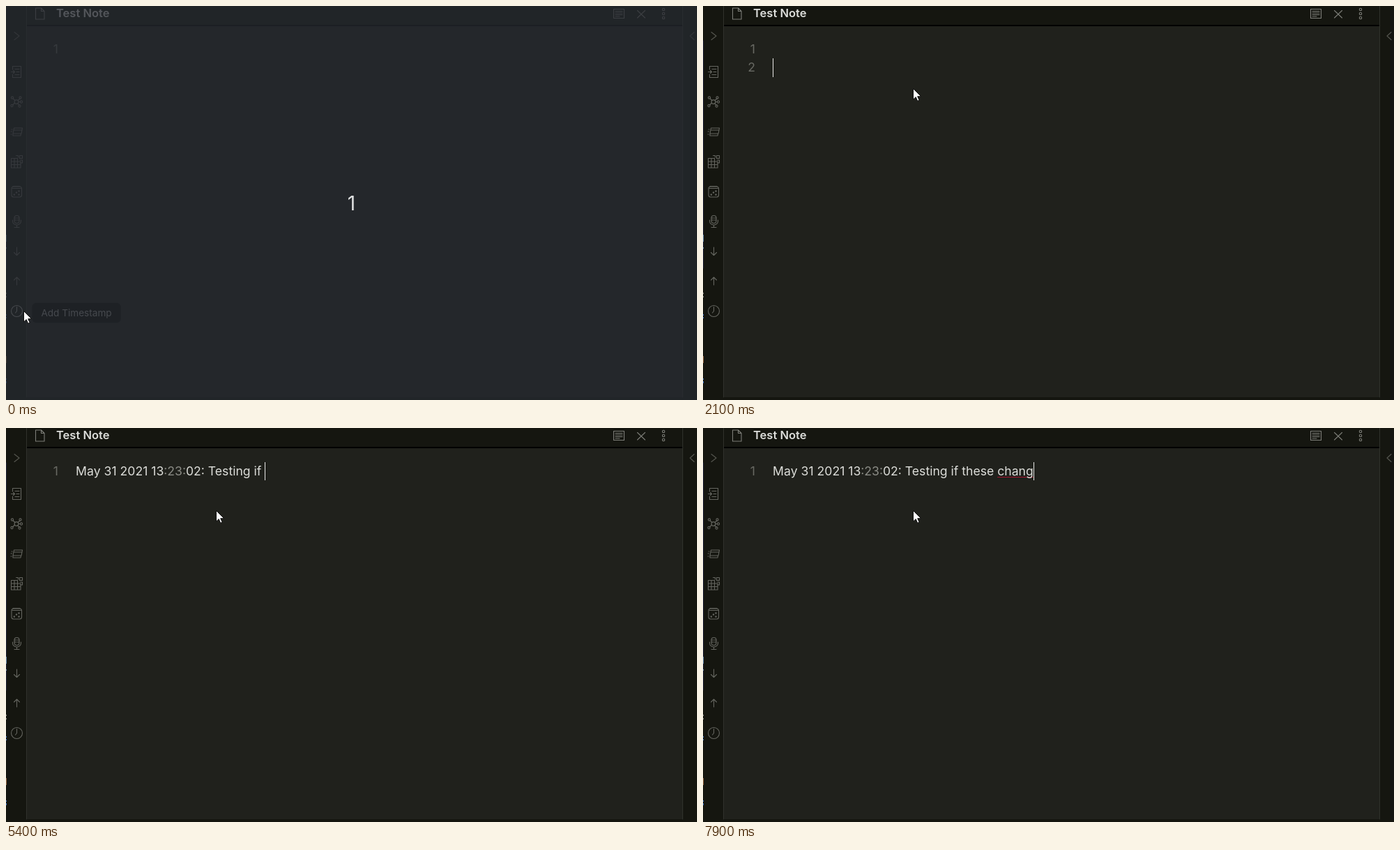
An HTML page that plays this animation: 991x565 px, repeating every 8000 ms.

```html
<!DOCTYPE html>
<html lang="en">
<head>
<meta charset="utf-8">
<title>Timestamp note</title>
<style>
  html, body { margin: 0; width: 100%; height: 100%; overflow: hidden; background: #20211c; }
  body { font-family: Inter, sans-serif; }
  #stage { position: relative; width: 991px; height: 565px; overflow: hidden; }
  #stage > * { position: absolute; }
  svg { left: 0; top: 0; overflow: visible; }
  #title { left: 72px; top: 0; font-size: 16.5px; font-weight: 600; line-height: 21px; color: #dcddda; }
  #gutter, #note { top: 49px; font-size: 17.6px; line-height: 26.4px; white-space: pre; }
  #gutter { left: 40px; width: 35px; text-align: right; color: #686963; }
  #note { left: 100px; color: #dcddd9; }
  #note span { font-kerning: none; }
  #note i { font-style: normal; color: #8b8c86; }
  #note u { text-decoration: underline 1.4px #a5142f; text-underline-offset: 2px; text-decoration-skip-ink: none; }
  #note b { display: inline-block; width: 1px; height: 26.4px; margin-right: -1px; vertical-align: top; background: #e8e8e6; }
  #tip { left: 34px; top: 425px; width: 134px; height: 30px; border-radius: 6px; background: #000;
         color: #c6c7c4; font-size: 14.3px; line-height: 30px; text-align: center; white-space: nowrap; }
  #veil { inset: 0; background: rgba(38, 42, 48, .75); font-size: 28px; line-height: 34px;
          text-align: center; color: #dfe0e1; padding-top: 266px; }
</style>
</head>
<body>
<div id="stage">
  <svg width="991" height="565" fill="none" stroke-linecap="round" stroke-linejoin="round">
    <path fill="#151610" d="M0 0h991v28H0zM0 28h30v537H0zM970 28h21v537h-21zM0 561h991v4H0z"/>
    <path stroke="#30322c" d="M29.5 0v561M970.5 0v561"/>
    <path stroke="#000" stroke-width="2" stroke-linecap="butt" d="M30 28h940"/>
    <path stroke="#22243a" d="M.5 50v326"/>
    <!-- window edge showing behind the left border -->
    <g stroke-linecap="butt">
      <path stroke="#6f93b8" d="M.5 328v10M.5 346v2"/>
      <path stroke="#8a8a84" d="M.5 411v2M.5 416v2"/>
      <path stroke="#3f74c8" d="M.5 442v2M.5 446v2M.5 534v2M.5 538v3"/>
      <path stroke="#9a6a45" d="M.5 502v10"/>
    </g>
    <!-- ribbon, top to bottom -->
    <g stroke="#64655f" stroke-width="1.1">
      <path stroke="#55564f" d="M12 37.5l7 5.5-7 5.5M987 37.5l-6 5.500 6 5.500"/>
      <path d="M9.500 91v-4.500h12v16h-12V98M13 90.500h6M15 94.500h4M13 98.500h6M7.500 94.500h5m-2-2 2 2-2 2"/>
      <circle cx="15" cy="137.500" r="2.900"/>
      <path d="M12.800 135.500L10 132.500M17.200 135.500l3-3M12.500 139l-3 3M17 139.700l2 2.600M18 137.500h2"/>
      <circle cx="9" cy="131.500" r="1.600"/><circle cx="20.500" cy="131.500" r="1.600"/>
      <circle cx="8.500" cy="143" r="1.600"/><circle cx="19.500" cy="143.500" r="1.600"/><circle cx="22" cy="137.500" r="1.600"/>
      <path d="M11.500 175h12l-1.500 8H10zM11 178h12M9 177H8M8.500 180H7M10 183v3h11l.5-3M8 184h-1"/>
      <path d="M7.500 218.500h9v4.500h4.500v9H7.500zM7.500 223h9M7.500 227.500H21M12 218.500V232M16.500 223v9"/>
      <path d="M14.500 214.500h3v2.500M19.500 214.500h4v4h-4zM20.500 221h3v4h-2.500"/>
      <rect x="8" y="259" width="14.500" height="15" rx="3"/>
      <path d="M9 261.500h12.500M10 258.500h10"/>
      <g fill="#64655f" stroke="none">
        <circle cx="18.500" cy="265.500" r="1.200"/><circle cx="15" cy="267.500" r="1.200"/>
        <circle cx="11.800" cy="270.500" r="1.200"/><circle cx="18.500" cy="270.500" r="1.200"/>
      </g>
      <rect x="12" y="300.500" width="7" height="11" rx="3.500"/>
      <path d="M12 304h3M12 307h3M16.500 304H19M16.500 307H19M9.500 307v1.500a6 5.500 0 0 0 12 0V307M15.500 314v3.500M12 317.500h7"/>
      <path d="M15.500 346v11.500m-4-4 4 4 4-4M15.500 400v-11m-4 4 4-4 4 4"/>
      <g id="clock"><circle cx="15.500" cy="437.500" r="8"/><path d="M15.500 431.500v6l-2 2.500"/></g>
    </g>
    <!-- header -->
    <g stroke="#7c7d77" stroke-width="1.1">
      <path d="M42.500 3h8l4.500 4.500V19H42.500zM50.500 3v4.500H55"/>
      <path d="M871.500 4.500h15v13h-15zM874 7.500h10M874 10h10M874 12.500h10M874 15h6"/>
      <path d="M905.500 6.500l11 10.500M916.500 6.500l-11 10.500"/>
      <circle cx="943" cy="5" r="1.700"/><circle cx="943" cy="11" r="1.700"/><circle cx="943" cy="17" r="1.700"/>
    </g>
  </svg>
  <div id="title">Test Note</div>
  <div id="gutter"></div>
  <div id="note"></div>
  <div id="tip">Add Timestamp</div>
  <div id="veil">1</div>
  <svg width="991" height="565">
    <path id="arrow" fill="#fff" stroke="#111" d="M.5 .5v15.500l3.700-3.400 2.500 5.700 2.500-1.100-2.500-5.500h5z"/>
    <g id="hand" fill="#fff" stroke="#111" stroke-width=".8">
      <path d="M-.8 1.200q1.500-2 3 0V5l6 1.200q1.500.4 1.300 2L8.500 15H.5L-5 9q-.8-2 1.200-2L-.8 8.500z"/>
      <path d="M3 6.500v3M5.500 7v3M8 7.500v2.500" fill="none"/>
    </g>
    <path id="beam" fill="none" stroke="#e6e6e4" stroke-width="1.200"
      d="M-3-6.500q2.500 0 3 1.500 .5-1.500 3-1.500M0-5V5.500M-3 7q2.500 0 3-1.500 .5 1.500 3 1.500"/>
  </svg>
</div>
<script>
const $ = id => document.getElementById(id);
const LOOP = 8000, STEP = 100;
const STAMP = '<span>May 31 2021 13<i>:23:</i>02:</span>';

// [time, line number, text after the stamp (null = empty line), misspelt tail]
const edits = [
  [0, 1, null], [400, 3, ' '], [1800, 3, null], [2100, 2, null], [2200, 1, null],
  [2600, 1, ' '], [2800, 1, ''], [3200, 1, ' '],
  [3400, 1, ' T'], [3600, 1, ' Te'], [3800, 1, ' ', 'Tes'], [3900, 1, ' ', 'Testi'],
  [4000, 1, ' ', 'Testin'], [4100, 1, ' Testing'], [4200, 1, ' Testing t'],
  [4400, 1, ' Testing ', 'th'], [4500, 1, ' Testing ', 'thi'],
  [4900, 1, ' Testing t'], [5000, 1, ' Testing '],
  [5200, 1, ' Testing i'], [5300, 1, ' Testing if'], [5400, 1, ' Testing if '],
  [6900, 1, ' Testing if t'], [7000, 1, ' Testing if ', 'th'], [7100, 1, ' Testing if the'],
  [7200, 1, ' Testing if ', 'thes'], [7400, 1, ' Testing if these'], [7500, 1, ' Testing if these '],
  [7600, 1, ' Testing if these c'], [7700, 1, ' Testing if these ', 'ch'],
  [7800, 1, ' Testing if these ', 'chan'], [7900, 1, ' Testing if these ', 'chang']
];

// [time, x, y, pointer shape]
const moves = [
  [0, 25, 437, 'arrow'], [100, 27, 438, 'hand'], [400, 27, 438, 'hand'],
  [500, 60, 400, 'beam'], [900, 288, 125.5, 'beam'], [1000, 288, 125.5, 'beam'],
  [1100, 302.5, 119.5, 'beam'], [1400, 302.5, 119.5, 'beam'],
  [1500, 303.5, 119.5, 'beam'], [2000, 303.5, 119.5, 'beam'],
  [2100, 301, 118, 'arrow'], [LOOP, 301, 118, 'arrow']
];

const lastBefore = (list, t) => list.findLastIndex(item => item[0] <= t);
const show = (id, on) => { $(id).style.display = on ? '' : 'none'; };

function drawPointer(t) {
  const k = lastBefore(moves, t);
  const [t0, x0, y0, shape] = moves[k], [t1, x1, y1] = moves[k + 1];
  const p = (t - t0) / (t1 - t0);
  for (const id of ['arrow', 'hand', 'beam']) show(id, id === shape);
  $(shape).setAttribute('transform', `translate(${x0 + (x1 - x0) * p} ${y0 + (y1 - y0) * p})`);
}

function drawNote(t) {
  const [, row, text, typo] = edits[lastBefore(edits, t)];
  const caret = t >= 1100 && !(t >= 6000 && t < 6500);
  $('gutter').textContent = [1, 2, 3].slice(0, row).join('\n');
  $('note').innerHTML = '\n'.repeat(row - 1) + (text === null ? '' : STAMP + text)
    + (typo ? `<u>${typo}</u>` : '') + (caret ? '<b></b>' : '');
}

function drawHover(t) {
  const veiled = t < 100, hovered = t < 500;
  show('veil', veiled);
  show('tip', hovered);
  $('tip').style.transform = veiled ? 'scale(.95)' : '';
  $('tip').style.opacity = veiled ? .8 : 1;
  $('clock').style.stroke = hovered ? '#a5a6a0' : '';
}

const start = performance.now();
let shown = -1;
function frame() {
  const t = Math.floor((performance.now() - start) % LOOP / STEP) * STEP;
  if (t !== shown) {
    shown = t;
    drawNote(t);
    drawPointer(t);
    drawHover(t);
  }
  requestAnimationFrame(frame);
}
frame();
</script>
</body>
</html>
```
